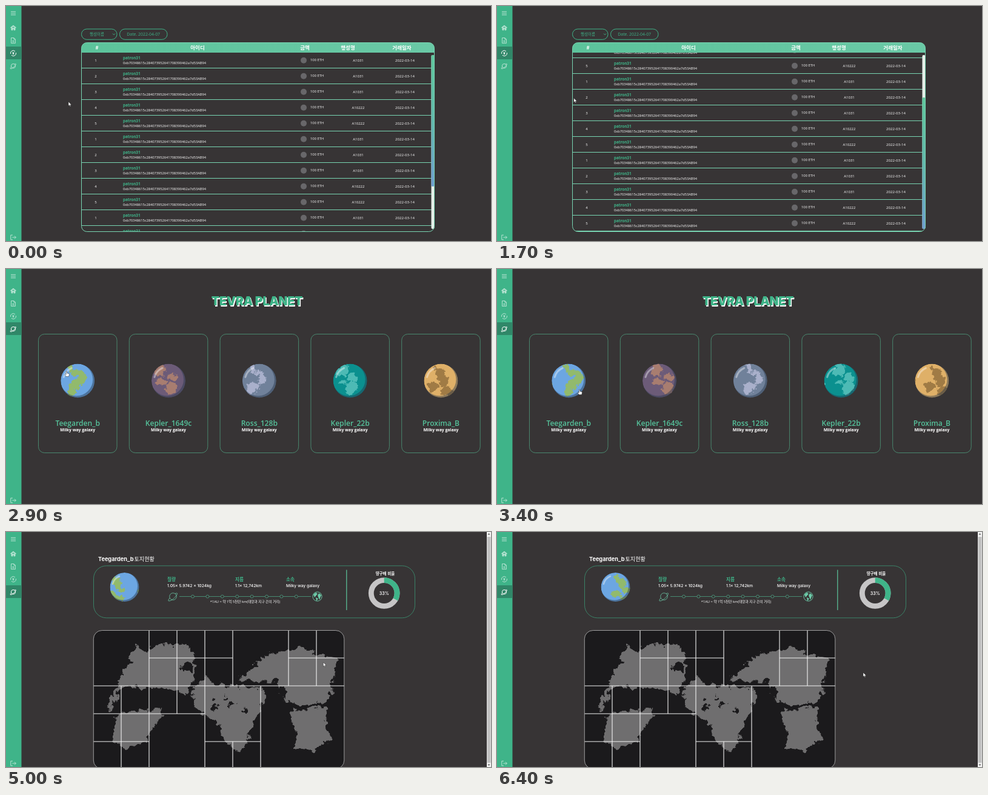
Write an HTML page that moves like this. It is 800 px wide and 388 px high and loops after 6500 ms.

```html
<!DOCTYPE html>
<html lang="ko">
<head>
<meta charset="utf-8">
<title>Planet dashboard</title>
<style>
html, body { margin: 0; width: 100%; height: 100%; overflow: hidden; background: #373435; }
svg { display: block; width: 100vw; height: 100vh; }
text { font-family: "Open Sans", "Noto Sans CJK KR", "Noto Sans CJK", sans-serif; fill: #fff; }
.inter { font-family: Inter, "Noto Sans CJK KR", "Noto Sans CJK", sans-serif; }
.cjk { font-family: "Noto Sans CJK KR", "Noto Sans CJK", sans-serif; }
.green { fill: #3fb489; }
</style>
</head>
<body>
<script>
const LOOP = 6500, STEP = 100;
const GREEN = '#3fb489', MINT = '#78d5b2', BG = '#373435', SEA = '#1b1a1c', PALE = '#b8e3d3';

function el(tag, attrs, parent) {
  const node = document.createElementNS('http://www.w3.org/2000/svg', tag);
  for (const key in attrs) node.setAttribute(key, attrs[key]);
  if (parent) parent.appendChild(node);
  return node;
}
const group = (parent, attrs = {}) => el('g', attrs, parent);
const path = (parent, d, attrs) => el('path', { d, ...attrs }, parent);
const rect = (parent, x, y, width, height, attrs) => el('rect', { x, y, width, height, ...attrs }, parent);
const circle = (parent, cx, cy, r, attrs) => el('circle', { cx, cy, r, ...attrs }, parent);
function label(parent, x, y, str, size, attrs = {}) {
  const node = el('text', { x, y, 'font-size': size, ...attrs }, parent);
  node.textContent = str;
  return node;
}
const MIDDLE = { 'text-anchor': 'middle' };
const outline = (stroke, width = 1) => ({ fill: 'none', stroke, 'stroke-width': width });

const svg = el('svg', { viewBox: '0 0 800 388' }, document.body);
const defs = el('defs', {}, svg);
const clip = id => el('clipPath', { id }, defs);

function gradient(id, colors, vertical) {
  const g = el('linearGradient', { id, x2: vertical ? 0 : 1, y2: vertical ? 1 : 0 }, defs);
  colors.forEach((c, i) => el('stop', { offset: i / (colors.length - 1), 'stop-color': c }, g));
}
function roughen(id, baseFrequency, scale) {
  const f = el('filter', { id, x: '-10%', y: '-10%', width: '120%', height: '120%', 'color-interpolation-filters': 'sRGB' }, defs);
  el('feTurbulence', { type: 'fractalNoise', baseFrequency, numOctaves: 3, seed: 4, result: 'noise' }, f);
  el('feDisplacementMap', { in: 'SourceGraphic', in2: 'noise', scale, xChannelSelector: 'R', yChannelSelector: 'G' }, f);
}
gradient('thumb', ['#5fc79d', '#62b9ad', '#6f9fd0'], true);
gradient('head', ['#5cc39b', '#6ac9a6']);
roughen('coast', .1, 17);
roughen('patch', .13, 12);

function random(seed) {
  return () => (seed = seed * 16807 % 2147483647) / 2147483647;
}

rect(svg, 0, 0, 800, 388, { fill: BG });
const pages = [group(svg), group(svg), group(svg)];
const [trades, planets, land] = pages;

// Sidebar
rect(svg, 0, 0, 25.5, 388, { fill: GREEN });
const active = rect(svg, 0, 67, 25.5, 21, { fill: '#308768' });
const hover = rect(svg, 0, 88, 25.5, 21, { fill: '#389c78' });
const icon = (y, d) => path(svg, d, { ...outline(PALE), transform: `translate(12 ${y})`, 'stroke-linejoin': 'round' });
const SATURN = 'M-3.6 0A3.6 3.6 0 1 1 3.6 0 3.6 3.6 0 1 1-3.6 0M-3.4 1.5C-7 6-3 5 0 2.6S7-5 2.2-3';
icon(12, 'M-4-2.7H4M-4 0H4M-4 2.7H4');
icon(36, 'M-4.8 0 0-4 4.8 0M-3 0V3.8H-1V1H1V3.8H3V0L0-2.4Z').setAttribute('fill', PALE);
icon(57, 'M-3.4-4.4H1L3.4-2V4.4H-3.4ZM1-4.4V-2H3.4M-1.6.4H1.6M-1.6 2.3H1.6');
const coinIcon = icon(78, 'M-4.4 1A4.4 4.4 0 0 1 3-3.2M4.4-1A4.4 4.4 0 0 1-3 3.2M-1.4-2 0 0 1.4-2M0 0V2.3M-1.3.7H1.3');
const planetIcon = icon(99, SATURN);
icon(382, 'M-1-3.8H-4.2V3.8H-1M-1.6 0H4.4M2-2.4 4.4 0 2 2.4');

// Trade list
const ADDRESS = '0xb70348615c284073952641708390462a7d53AB94';
rect(trades, 124.5, 38, 58.5, 17.3, { ...outline(GREEN), rx: 8.6 });
label(trades, 150, 49, '행성이름', 6.5, { ...MIDDLE, class: 'green' });
path(trades, 'M176 45.6 178 47.6 180 45.6', outline(GREEN));
rect(trades, 187.5, 38, 78.5, 17.3, { ...outline(GREEN), rx: 8.6 });
label(trades, 226.7, 49, 'Date. 2022-04-07', 6.9, { ...MIDDLE, class: 'green' });

rect(clip('tableClip'), 124.5, 60.5, 582, 312, { rx: 9 });
rect(clip('bodyClip'), 124, 77, 583, 296);
const table = group(trades, { 'clip-path': 'url(#tableClip)' });
const rows = group(group(table, { 'clip-path': 'url(#bodyClip)' }));
for (let i = 0; i < 15; i++) {
  const y = 77 + i * 26, n = i % 5 + 1;
  label(rows, 148, y + 15.2, n, 6, MIDDLE);
  label(rows, 193, y + 10.7, 'patron31', 6.3, { 'font-weight': 700, class: 'green' });
  label(rows, 193, y + 18.9, ADDRESS, 5.7);
  circle(rows, 491, y + 12.8, 5, { fill: '#68676a' });
  label(rows, 502, y + 14.3, '100 ETH', 5.8);
  label(rows, 581, y + 15.2, n > 3 ? 'A10222' : 'A1031', 6, MIDDLE);
  label(rows, 658, y + 15.2, '2022-03-14', 6.1, MIDDLE);
  rect(rows, 124, y + 25, 583, 1, { fill: MINT });
}
rect(table, 124, 60, 583, 17, { fill: 'url(#head)' });
[[150, '#'], [316, '아이디'], [493, '금액'], [564, '행성명'], [653, '거래일자']].forEach(([x, s]) =>
  label(table, x, 72, s, 8.5, { ...MIDDLE, class: 'cjk', 'font-weight': 700 }));
rect(trades, 701.5, 81, 5, 287, { rx: 2, fill: '#e6efe9' });
const thumb = rect(trades, 701.5, 81, 5, 217, { rx: 2, fill: 'url(#thumb)' });
rect(trades, 124.5, 60.5, 582, 312, { ...outline(MINT), rx: 9 });

// Rotating planets of radius 28; two continents half a TILE apart make up each surface
const TILE = 112, SPIN = 28 / 1500, SPIN_START = 3400;
const surfaces = [];
circle(clip('disc'), 0, 0, 28);

const KINDS = [
  ['Teegarden_b', '#6ca6e2', '#92ba6c'],
  ['Kepler_1649c', '#6c5b78', '#a87d70'],
  ['Ross_128b', '#70819a', '#a9b0cb'],
  ['Kepler_22b', '#0b908f', '#4dbab5'],
  ['Proxima_B', '#dfb068', '#a07b45']
];
function planet(parent, cx, cy, r, kind) {
  const [, base, patch] = KINDS[kind];
  const rnd = random(4177 * (kind + 3));
  const ball = group(group(parent, { transform: `translate(${cx} ${cy}) scale(${r / 28})` }), { 'clip-path': 'url(#disc)' });
  circle(ball, 0, 0, 28, { fill: base });
  const surface = group(ball);
  const tile = group(surface, { filter: 'url(#patch)' });
  for (let i = 0; i < 12; i++) {
    const x = 8 + i % 2 * TILE / 2 + (rnd() - .5) * 28, y = (i / 11 - .5) * 42;
    const rx = 5 + rnd() * 6, ry = 3.5 + rnd() * 5;
    for (const shift of [-TILE, 0, TILE]) el('ellipse', { cx: x + shift, cy: y, rx, ry, fill: patch }, tile);
  }
  path(ball, 'M-28-28H28V28H-28ZM-29-2A27 27 0 1 0 25-2 27 27 0 1 0-29-2Z', { fill: '#26374a', 'fill-opacity': .45, 'fill-rule': 'evenodd' });
  path(ball, 'M-23-6A23 23 0 0 1-10-21', { ...outline('#fff', 3), 'stroke-opacity': .38, 'stroke-linecap': 'round' });
  surfaces.push(surface);
}

// Planet cards
const heading = { ...MIDDLE, 'font-weight': 900, 'letter-spacing': -.2 };
label(planets, 415.5, 61.5, 'TEVRA PLANET', 19.5, { ...heading, class: 'inter' });
label(planets, 414, 60, 'TEVRA PLANET', 19.5, { ...heading, class: 'inter green' });
const cards = group(planets);
KINDS.forEach(([name], i) => {
  const x = 53.5 + i * 149.8, mid = x + 64.7;
  rect(cards, x, 107.5, 129.5, 196, { ...outline('#4f9c7d', .8), rx: 10 });
  planet(cards, mid, 184.5, 28, i);
  label(cards, mid, 258.6, name, 12.1, { ...MIDDLE, 'font-weight': 600, style: 'fill:#55c29b' });
  label(cards, mid, 268, 'Milky way galaxy', 6.8, { ...MIDDLE, 'font-weight': 700 });
});

// Land status
const sheet = group(land);
label(land, 152, 47.6, 'Teegarden_b', 9.2, { class: 'inter', 'font-weight': 700 });
label(land, 211.5, 47.6, '토지현황', 9.1, { class: 'cjk' });
rect(sheet, 144.5, 55.8, 530, 86, { ...outline('#3d9c78', .75), rx: 21 });
planet(sheet, 195.5, 91, 24, 0);
[[266, '질량', '1.05× 5.9742 × 1024kg'], [378, '지름', '1.1× 12,742km'], [462, '소속', 'Milky way galaxy']].forEach(([x, title, value]) => {
  label(sheet, x, 81, title, 7.6, { class: 'cjk green', 'font-weight': 700 });
  label(sheet, x, 91.3, value, 6.75, { class: 'inter', 'font-weight': 500 });
});
const thin = { ...outline('#4fae8b', .7), fill: BG };
path(sheet, 'M286 106.5H503', thin);
for (let i = 0; i < 8; i++) circle(sheet, 308 + i * 24.4, 106.5, 2.5, thin);
path(sheet, SATURN, { ...outline('#6ccaa8', .5), transform: 'translate(275.5 106.5) scale(1.6)' });
circle(sheet, 513.5, 106.5, 7.6, { ...outline('#6ccaa8'), fill: BG });
path(sheet, 'M507 103 511 100 514 102 509 108ZM511 108 515 110 512 114ZM516 101 520 104 517 112 514 105Z', { fill: '#6ccaa8' });
label(sheet, 394.5, 117, '*1AU = 약 1억 5천만 km(태양과 지구 간의 거리)', 5.7, MIDDLE);
rect(sheet, 561.2, 62.5, 1.2, 66.5, { fill: '#5cc79f' });
label(sheet, 625.5, 71, '땅구매 비율', 6.5, { ...MIDDLE, class: 'cjk', 'font-weight': 700 });
circle(sheet, 623.7, 101, 21.4, outline('#c6c5c6', 8.8));
circle(sheet, 623.7, 101, 21.4, { ...outline(GREEN, 8.8), pathLength: 100, 'stroke-dasharray': '33 67', transform: 'rotate(-90 623.7 101)' });
label(sheet, 623.7, 103.6, '33%', 7, { ...MIDDLE, class: 'inter', 'font-weight': 600 });

// Continents: a few corners each, with a noisy coast and random lakes
rect(clip('mapClip'), 144.5, 162.5, 413.5, 228.5, { rx: 14 });
const map = group(sheet, { 'clip-path': 'url(#mapClip)' });
rect(map, 144, 162, 415, 230, { fill: SEA });
const coast = group(map, { filter: 'url(#coast)' });
[
  '203 200 216 186 228 198 244 188 298 186 313 202 310 240 298 268 262 257 236 258 192 255 172 296 168 290 188 238 206 214',
  '184 300 212 296 256 291 258 304 238 328 230 347 198 360 174 342',
  '308 262 328 238 346 252 420 257 428 268 416 302 404 322 398 350 382 363 360 344 348 314 312 292',
  '384 243 404 227 428 202 486 191 514 204 548 209 538 246 540 266 520 284 490 286 458 278 446 250 402 246',
  '466 298 484 291 530 288 527 318 536 344 508 361 476 356 480 326'
].forEach(points => el('polygon', { points, fill: '#6f6e6f' }, coast));
const rnd = random(2024);
[[296, 220, 22], [372, 284, 30], [452, 262, 22]].forEach(([x, y, spread]) => {
  for (let i = 0; i < 7; i++) {
    const a = rnd() * 2 * Math.PI, d = rnd() * spread;
    circle(coast, x + Math.cos(a) * d, y + Math.sin(a) * d, 2 + rnd() * 4, { fill: SEA });
  }
});
path(map, `M190 254V392M236 162V392M282 162V300M328 162V392M374 162V254M374 346V392M420 254V392M466 162V254M512 162V254
  M236 208H374M466 208H558M144 254H558M144 300H328M144 346H236M328 346H420`, outline('#f4f4f4', 1.1));
rect(sheet, 144.3, 162.5, 413.5, 228.5, { ...outline('#d0d0d0', .7), rx: 14 });

rect(land, 793, 0, 7, 388, { fill: '#f1f1f1' });
const pageThumb = rect(land, 793.7, 7, 5.8, 373, { fill: '#c1c1c1' });
path(land, 'M794.5 4.5 796.5 2 798.5 4.5ZM794.5 383.5 796.5 386 798.5 383.5Z', { fill: '#606060' });

// Pointer shapes, tip at the origin
const ink = { ...outline('#222', .5), fill: '#fff' };
const pointers = {
  arrow: path(svg, 'M0 0V7L1.6 5.6 2.7 8 3.8 7.5 2.8 5.2H5Z', ink),
  beam: path(svg, 'M-1.5-3.5H1.5M0-3.5V3.5M-1.5 3.5H1.5', outline('#c9c9c9', .8)),
  hand: path(svg, 'M-.8 0Q0-.8.8 0V3L4 3.8Q4.6 4.2 4.3 6L3.6 8.5H-.6L-3 5.5-2.2 4.4-.8 5.4Z', ink)
};
// Each move: start, end, destination
const moves = [
  [0, 200, 108, 160], [400, 700, 288, 226], [1300, 2000, 22, 104],
  [2400, 3200, 136, 199], [4400, 5200, 595, 218], [5800, 6100, 604, 232]
];

const progress = (t, from, to) => Math.min(1, Math.max(0, (t - from) / (to - from)));
const easeInOut = p => p * p * (3 - 2 * p);
const easeOut = p => 1 - (1 - p) ** 2.75;
const show = (node, on) => node.setAttribute('visibility', on ? 'inherit' : 'hidden');
const move = (node, x, y) => node.setAttribute('transform', `translate(${x} ${y})`);

function pointerAt(t) {
  let x = 103, y = 158;
  for (const [from, to, toX, toY] of moves) {
    const p = easeInOut(progress(t, from, to));
    x += (toX - x) * p;
    y += (toY - y) * p;
  }
  return [x, y];
}
function pointerShape(t, page, x) {
  if (page === 0) return x > 190 ? 'beam' : t > 1300 && x < 26 ? 'hand' : 'arrow';
  return page === 1 && x > 90 ? 'hand' : 'arrow';
}

function render(now) {
  const t = Math.floor(now % LOOP / STEP) * STEP;
  const page = t < 2400 ? 0 : t < 3900 ? 1 : 2;
  pages.forEach((p, i) => show(p, i === page));
  show(cards, t >= 2500 && page === 1);

  const [x, y] = pointerAt(t), shape = pointerShape(t, page, x);
  for (const name in pointers) {
    show(pointers[name], name === shape);
    move(pointers[name], x, y);
  }

  active.setAttribute('y', page ? 88 : 67);
  show(hover, !page && shape === 'hand');
  coinIcon.setAttribute('stroke', page ? PALE : '#fff');
  planetIcon.setAttribute('stroke', page ? '#fff' : PALE);

  const scroll = easeOut(progress(t, 500, 1200));
  move(rows, 0, -95 * scroll);
  move(thumb, 0, 70 * scroll);

  const turn = (t - SPIN_START) * SPIN;
  surfaces.forEach(s => move(s, turn - TILE * Math.round(turn / TILE), 0));

  const settled = t >= 4500;
  move(sheet, 0, settled ? 0 : 1);
  move(pageThumb, 0, settled ? 1 : 0);
}

const start = performance.now();
function tick() {
  render(performance.now() - start);
  requestAnimationFrame(tick);
}
tick();
</script>
</body>
</html>
```
